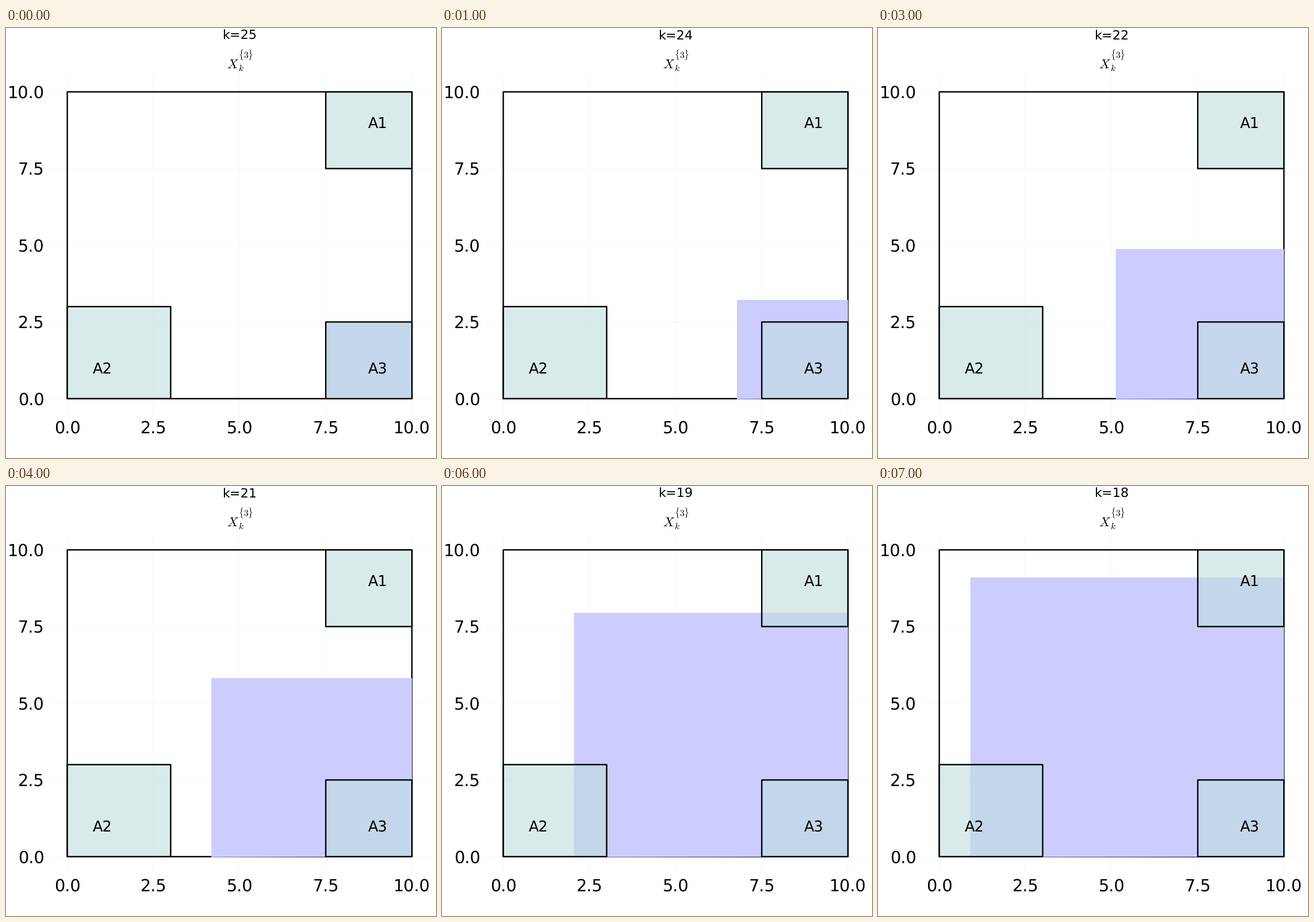
These frames come from a looping animation (748 by 748 pixels, 8000 ms). A matplotlib script:

```python
import matplotlib.pyplot as plt
from matplotlib.animation import FuncAnimation
from matplotlib.patches import Polygon, Rectangle

SIZE, DPI = 748, 100
PX = 72 / DPI  # points per pixel
TEAL = (190 / 255, 222 / 255, 221 / 255, 0.6)
LILAC = "#ccccff"
FIRST_K = 25
# Side of the reachable square at each step back in time
SIDES = [2.5, 3.22, 4.0, 4.88, 5.82, 6.855, 7.95, 9.1]

plt.rcParams.update({
    "font.family": "DejaVu Sans",
    "mathtext.fontset": "cm",
    "text.hinting": "none",
    "path.snap": False,
})

fig = plt.figure(figsize=(SIZE / DPI, SIZE / DPI), dpi=DPI, facecolor="white")
ax = fig.add_axes([0, 0, 1, 1])
ax.set_xlim(0, SIZE)
ax.set_ylim(SIZE, 0)
ax.axis("off")


def px(x):
    return 106.6 + 59.95 * x


def py(y):
    return 644.8 - 53.37 * y


def label(x, base, text, size, ha="center"):
    return ax.text(x, base, text, fontsize=size * PX, ha=ha,
                   va="baseline", color="black", zorder=6)


def box(x, y, w, h, fill, z):
    ax.add_patch(Rectangle((px(x), py(y)), px(w) - px(0), py(h) - py(0),
                           facecolor=fill, edgecolor="none", zorder=z))
    ax.add_patch(Rectangle((px(x), py(y)), px(w) - px(0), py(h) - py(0),
                           fill=False, edgecolor="black", linewidth=2.4 * PX,
                           joinstyle="round", zorder=z + 0.1))


def reach(side):
    # the lower edge tilts by a fraction of a pixel
    left, top = px(10 - side), py(side)
    return [(left, top), (706.3, top), (706.3, 644.8), (left, 645.7)]


for i in range(5):
    v = 2.5 * i
    ax.plot([px(v)] * 2, [84, 671], color="#f7f7f7", lw=PX, zorder=1)
    ax.plot([76, 739], [py(v)] * 2, color="#f7f7f7", lw=PX, zorder=1)
    label(px(v), 704.7, f"{v:.1f}", 28.8)
    label(66.5, py(v) + 10.5, f"{v:.1f}", 28.8, ha="right")

box(0, 0, 10, 10, "none", 2)
square = ax.add_patch(Polygon(reach(SIDES[0]), facecolor=LILAC,
                              edgecolor="none", zorder=3))

for name, (x, y, side), (tx, ty) in [
    ("A1", (7.5, 7.5, 2.5), (9, 9)),
    ("A2", (0, 0, 3), (1, 1)),
    ("A3", (7.5, 0, 2.5), (9, 1)),
]:
    box(x, y, side, side, TEAL, 4)
    label(px(tx) + 0.8, py(ty) + 9.6, name, 25.6)

label(384.3, 69.7, "$X$", 22.5, ha="left")
label(404, 52.6, r"$\{3\}$", 15.6, ha="left")
label(404, 74.6, "$k$", 15.6, ha="left")
title = label(407, 19.8, f"k={FIRST_K}", 22.4)


def update(i):
    title.set_text(f"k={FIRST_K - i}")
    square.set_xy(reach(SIDES[i]))
    return title, square


anim = FuncAnimation(fig, update, frames=len(SIDES), interval=1000,
                     repeat=True, repeat_delay=0, blit=False)
plt.show()
```
